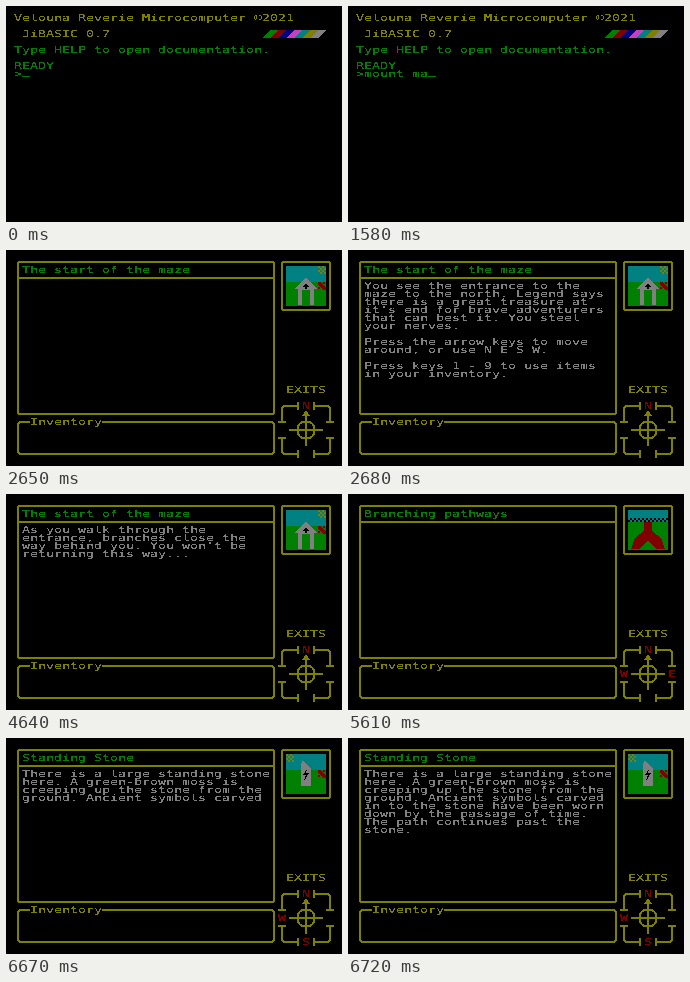
These frames come from a looping animation (336 px wide and 216 px high, 8000 ms). An HTML page:

```html
<!DOCTYPE html>
<html lang="en">
<head>
<meta charset="utf-8">
<title>Maze adventure</title>
<style>
html, body { margin: 0; width: 100%; height: 100%; overflow: hidden; background: #000; }
svg { display: block; }
text { font: 9.6px "DejaVu Sans Mono", monospace; text-rendering: geometricPrecision; }
.line { fill: none; stroke: #808000; stroke-width: 2; }
</style>
</head>
<body>
<svg width="336" height="216" viewBox="0 0 336 216" shape-rendering="crispEdges">
  <defs>
    <filter id="crisp" filterUnits="userSpaceOnUse" x="0" y="0" width="336" height="216" color-interpolation-filters="sRGB">
      <feComponentTransfer><feFuncA type="discrete" tableValues="0 0 1 1 1"/></feComponentTransfer>
    </filter>
  </defs>
  <g id="art"></g>
  <g id="words" filter="url(#crisp)"></g>
</svg>
<script>
const GREEN = '#008000', OLIVE = '#808000', GREY = '#808080', RED = '#800000',
      BLUE = '#000080', TEAL = '#008080', PINK = '#c040c0';
const WIDE = 1.384; // character cells are wider than the font's own
const LOOP = 8000;

const rect = (x, y, w, h, c) => `<rect x="${x}" y="${y}" width="${w}" height="${h}" fill="${c}"/>`;
const poly = (pts, c) => `<polygon points="${pts}" fill="${c}"/>`;
const line = d => `<path class="line" d="${d}"/>`;
const box = (x, y, w, h, r = 2) =>
  `<rect class="line" x="${x}" y="${y}" width="${w}" height="${h}" rx="${r}"/>`;

// One glyph per 8-pixel cell, top left cell corner at x, y
function text(x, y, s, c) {
  const xs = [...s].map((_, i) => ((x + i * 8) / WIDE).toFixed(2)).join(' ');
  return `<text transform="scale(${WIDE} 1)" x="${xs}" y="${y + 7}" fill="${c}">${s}</text>`;
}
const lines = (rows, y) => rows.map((s, i) => s && text(16, y + i * 8, s, GREY)).join('');

function dots(x, y, w, h, c) {
  let out = '';
  for (let j = 0; j < h; j += 2)
    for (let i = j / 2 % 2 * 2; i < w; i += 4) out += rect(x + i, y + j, 2, 2, c);
  return out;
}

// Thumbnails fill 280,16 to 320,56
const land = horizon =>
  rect(280, 16, 40, horizon - 16, TEAL) + rect(280, horizon, 40, 56 - horizon, GREEN);
const bush = poly('312,32 315,32 320,38 320,40 317,40 312,35', RED) +
  rect(317, 32, 2, 2, RED) + rect(312, 37, 2, 2, RED);

const gate = land(32) + dots(312, 16, 8, 8, OLIVE) + bush +
  poly('288,39 300,28 312,39 308,39 308,55 292,55 292,39', GREY) +
  rect(296, 40, 8, 15, GREEN) +
  poly('300,33 303,37 301,37 301,39 299,39 299,37 297,37', '#000');

const fork = land(28) + rect(280, 24, 40, 4, '#000') + dots(280, 24, 40, 4, TEAL) +
  poly('296,28 304,28 304,37 313,44 317,55 308,55 300,46 292,55 283,55 287,44 296,37', RED) +
  poly('300,47 308,56 292,56', GREEN);

const stone = land(32) + dots(280, 16, 8, 8, OLIVE) + bush +
  poly('296,23 298,23 305,31 305,48 295,48 295,28', GREY) +
  poly('301,31 297,37 300,37 298,43 303,35 300,35', '#000');

const rooms = {
  start: {
    title: 'The start of the maze', pic: gate, exits: 'N',
    rows: ['You see the entrance to the', 'maze to the north. Legend says',
      'there is a great treasure at', "it's end for brave adventurers",
      'that can best it. You steel', 'your nerves.', '',
      'Press the arrow keys to move', 'around, or use N E S W.', '',
      'Press keys 1 - 9 to use items', 'in your inventory.']
  },
  enter: {
    title: 'The start of the maze', pic: gate, exits: 'N',
    rows: ['As you walk through the', 'entrance, branches close the',
      "way behind you. You won't be", 'returning this way...']
  },
  fork: {
    title: 'Branching pathways', pic: fork, exits: 'NWE',
    rows: ['Your view deeper in to the maze', 'is obscured by a permanent fog.',
      'The muddy path branches', 'multiple ways here.']
  },
  stone: {
    title: 'Standing Stone', pic: stone, exits: 'NWS',
    rows: ['There is a large standing stone', 'here. A green-brown moss is',
      'creeping up the stone from the', 'ground. Ancient symbols carved',
      'in to the stone have been worn', 'down by the passage of time.',
      'The path continues past the', 'stone.']
  }
};

const exitSpots = { N: [296, 152], W: [272, 176], E: [320, 176], S: [296, 200] };

const compass =
  // each corner of the frame ends in two door posts
  [[1, 1], [-1, 1], [1, -1], [-1, -1]].map(([a, b]) => {
    const x = d => 300 + a * d, y = d => 180 + b * d;
    return line(`M${x(8)} ${y(24)}H${x(22)}L${x(24)} ${y(22)}V${y(8)}` +
      `M${x(8)} ${y(20)}V${y(28)}M${x(20)} ${y(8)}H${x(28)}`);
  }).join('') +
  box(292, 172, 16, 16, 6) + line('M300 162V196M283 180H317') +
  poly('300,160 304,166 296,166', OLIVE);

const panels = box(12, 12, 256, 152) + line('M12 28H268') + box(276, 12, 48, 48) +
  line('M24 172H14L12 174V202L14 204H266L268 202V174L266 172H96') + compass;

const stripes = [GREEN, RED, BLUE, PINK, TEAL, OLIVE, GREY].map((c, i) => {
  const x = 256 + i * 8;
  return poly(`${x},32 ${x + 8},24 ${x + 16},24 ${x + 8},32`, c);
}).join('');

const command = 'mount maze';
const keyTimes = [50, 280, 510, 660, 840, 1300, 1430, 1580, 1810, 2090];

function boot(t) {
  const n = keyTimes.filter(k => t >= k).length;
  return {
    art: stripes + (t < 2500 ? rect(16 + n * 8, 70, 8, 1, GREEN) : ''),
    words: text(8, 8, 'Velouna Reverie Microcomputer ©2021', OLIVE) +
      text(16, 24, 'JiBASIC 0.7', OLIVE) +
      text(8, 40, 'Type HELP to open documentation.', GREEN) +
      text(8, 56, 'READY', GREEN) +
      text(8, 64, '&gt;', GREEN) + text(16, 64, command.slice(0, n), GREEN) +
      (t >= 2550 ? text(8, 72, 'Diskette "MAZE" mounted.', GREEN) : '')
  };
}

function room({ title, pic, exits, rows }, shown = rows.length) {
  return {
    art: panels + pic,
    words: text(16, 16, title, GREEN) + lines(rows.slice(0, shown), 32) +
      text(24, 168, 'Inventory', OLIVE) + text(280, 136, 'EXITS', OLIVE) +
      [...exits].map(e => text(...exitSpots[e], e, RED)).join('')
  };
}

function scene(t) {
  if (t < 2600) return boot(t);
  if (t < 2640) return { art: '', words: '' };
  if (t < 2680) return room(rooms.start, 0);
  if (t < 4640) return room(rooms.start);
  if (t < 5610) return room(rooms.enter);
  if (t < 5650) return room(rooms.fork, 0);
  if (t < 5690) return room(rooms.fork, 2);
  if (t < 6670) return room(rooms.fork);
  if (t < 6720) return room(rooms.stone, 4);
  return room(rooms.stone);
}

const layers = { art: document.getElementById('art'), words: document.getElementById('words') };
const last = {};

function draw() {
  const now = scene(performance.now() % LOOP);
  for (const k in layers)
    if (now[k] !== last[k]) layers[k].innerHTML = last[k] = now[k];
  requestAnimationFrame(draw);
}
draw();
</script>
</body>
</html>
```
